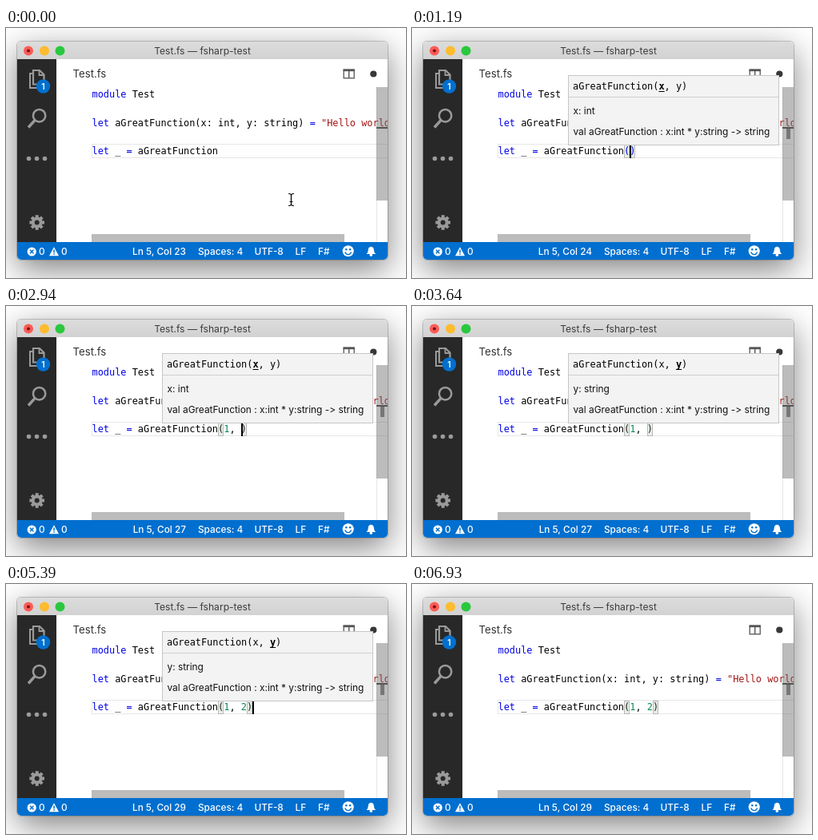
An HTML page with a canvas for the animation above (7000 ms loop, 500x313 px).

```html
<!DOCTYPE html>
<html lang="en">
<head>
<meta charset="utf-8">
<title>Parameter hints</title>
<style>
  html, body { margin: 0; width: 100%; height: 100%; overflow: hidden; background: #fff; }
  canvas { display: block; width: 500px; height: 313px; }
</style>
</head>
<body>
<canvas id="stage" width="500" height="313"></canvas>
<script>
const ctx = document.getElementById('stage').getContext('2d');
const LOOP = 7000, STEP = 70, BLINK = 505;
const LEFT = 14, TOP = 17, WIDTH = 463, HEIGHT = 273;
const CODE_X = 107.5, CHAR = 11.9 * 0.602;
const MONO = '"DejaVu Sans Mono", monospace';
const SANS = 'Inter, sans-serif';
const BLUE = '#0000e6', STRING = '#a31515', NUMBER = '#09885a', STATUS = '#006fcf';
const ICON = '#9a9a9a', SIDEBAR = '#282828';

// Each key press: time, text inside the parentheses, caret column
const keys = [
  { at: 50, args: null, col: 23 },
  { at: 1050, args: '', col: 24 },
  { at: 2030, args: '1', col: 25 },
  { at: 2660, args: '1,', col: 26 },
  { at: 2860, args: '1, ', col: 27 },
  { at: 3990, args: '1, 2', col: 28 },
  { at: 5375, args: '1, 2', col: 29 }
];
const HINT_ON = 1190, HINT_SECOND = 3010, HINT_OFF = 5440;

function rect(x, y, w, h, color) {
  ctx.fillStyle = color;
  ctx.fillRect(x, y, w, h);
}

function frame(x, y, w, h, color, width = 1) {
  ctx.strokeStyle = color;
  ctx.lineWidth = width;
  ctx.strokeRect(x, y, w, h);
}

function disc(x, y, r, color) {
  ctx.fillStyle = color;
  ctx.beginPath();
  ctx.arc(x, y, r, 0, Math.PI * 2);
  ctx.fill();
}

function path(points, color, width, close) {
  ctx.beginPath();
  points.forEach(([x, y]) => ctx.lineTo(x, y));
  if (close) ctx.closePath();
  if (width) {
    ctx.strokeStyle = color;
    ctx.lineWidth = width;
    ctx.stroke();
  } else {
    ctx.fillStyle = color;
    ctx.fill();
  }
}

// Returns the x position just after the text
function text(str, x, y, size, color, { font = SANS, weight = 400, align = 'left' } = {}) {
  ctx.font = `${weight} ${size}px ${font}`;
  ctx.textAlign = align;
  ctx.fillStyle = color;
  ctx.fillText(str, x, y);
  return x + ctx.measureText(str).width;
}

// Draws [text, colour, weight] runs on a monospaced line
function code(x, y, runs) {
  for (const [str, color = '#000', weight = 400] of runs) {
    text(str, x, y, 11.9, color, { font: MONO, weight });
    x += str.length * CHAR;
  }
}

function windowShape(grow = 0) {
  ctx.beginPath();
  ctx.roundRect(LEFT - grow, TOP - grow, WIDTH + 2 * grow, HEIGHT + 2 * grow, 5);
}

function drawShadow() {
  ctx.save();
  ctx.shadowColor = 'rgba(0,0,0,.5)';
  ctx.shadowBlur = 40;
  ctx.shadowOffsetY = 12;
  ctx.fillStyle = '#fff';
  windowShape();
  ctx.fill();
  ctx.restore();
  ctx.strokeStyle = 'rgba(0,0,0,.2)';
  ctx.lineWidth = 1;
  windowShape(.5);
  ctx.stroke();
}

function drawTitleBar() {
  const shade = ctx.createLinearGradient(0, TOP, 0, 39);
  shade.addColorStop(0, '#dcdcdc');
  shade.addColorStop(1, '#d2d2d2');
  rect(LEFT, TOP, WIDTH, 22, shade);
  disc(28, 28.5, 6, '#fc5b57');
  disc(28, 28.5, 2, '#7c1010');
  disc(48, 28.5, 6, '#fdbc2e');
  disc(67.5, 28.5, 6, '#29c83f');
  text('Test.fs — fsharp-test', 245.5, 32.5, 12.1, '#3c3c3c', { align: 'center' });
}

function drawGear(x, y) {
  ctx.save();
  ctx.translate(x, y);
  for (let i = 0; i < 8; i++) {
    rect(-2, -9.3, 4, 5, ICON);
    ctx.rotate(Math.PI / 4);
  }
  ctx.restore();
  disc(x, y, 7, ICON);
  disc(x, y, 3, SIDEBAR);
}

function drawActivityBar() {
  rect(LEFT, 39, 49, 229, SIDEBAR);
  path([[34, 57], [30, 57], [30, 75], [42, 75], [42, 71]], ICON, 2);
  path([[34, 53], [42, 53], [47.5, 58.5], [47.5, 70.5], [34, 70.5]], ICON, 2.2, true);
  path([[41.5, 53], [41.5, 59], [47.5, 59]], ICON, 1.8);
  disc(46.5, 73, 8.7, STATUS);
  text('1', 46.5, 76.8, 10.5, '#fff', { weight: 600, align: 'center' });

  ctx.strokeStyle = ICON;
  ctx.lineWidth = 2.5;
  ctx.beginPath();
  ctx.arc(41.6, 109.7, 7.7, 0, Math.PI * 2);
  ctx.stroke();
  path([[36.2, 115.3], [28, 124.5]], ICON, 3.4);
  [28.5, 38.5, 48.5].forEach(x => disc(x, 163.5, 2.8, ICON));
  drawGear(38.7, 243.5);
}

function drawEditor(state, t) {
  text('Test.fs', 83.5, 61.5, 13.2, '#333');
  frame(422.2, 52.2, 13, 10.6, '#555', 1.3);
  rect(421.6, 51.6, 14.2, 2.6, '#555');
  rect(428, 52, 1.4, 11, '#555');
  disc(459.3, 57.5, 4.1, '#383838');

  frame(107.5, 145.5, 370, 17, '#e6e6e6');
  rect(463, 74, 1, 194, '#e6e6e6');

  code(CODE_X, 87, [['module', BLUE], [' Test']]);
  code(CODE_X, 123, [['let', BLUE], [' aGreatFunction(x: int, y: string) '],
    ['=', BLUE], [' '], ['"Hello world"', STRING]]);

  const { args, col } = state;
  const runs = [['let', BLUE], [' _ '], ['=', BLUE], [' aGreatFunction']];
  if (args !== null) {
    const bracketColor = args ? '#222' : BLUE;
    for (const offset of [22, 23 + args.length]) {
      const x = Math.round(CODE_X + offset * CHAR);
      rect(x, 146, 7, 17, '#e6efe6');
      frame(x + .5, 146.5, 6, 16, '#b9b9b9');
    }
    runs.push(['(', bracketColor]);
    for (const ch of args) runs.push([ch, /\d/.test(ch) ? NUMBER : '#000']);
    runs.push([')', bracketColor]);
  }
  code(CODE_X, 158, runs);

  if (Math.floor((t - state.at) / BLINK) % 2 === 0) {
    rect(Math.round(CODE_X + (col - 1) * CHAR), 145, 2, 18, '#000');
  }

  rect(463, 74, 15, 142, 'rgba(100,100,100,.43)');
  rect(107, 258, 316, 10, 'rgba(100,100,100,.43)');
  rect(463, 124, 15, 2, '#555');
  if (args !== null) rect(468, 126, 5, 13, '#777');
}

function drawHint(second) {
  rect(195, 59, 264, 88, '#f3f3f3');
  frame(195.5, 59.5, 263, 87, '#c6c6c6');
  rect(196, 86, 262, 1, '#cfcfcf');
  const weight = active => active ? 700 : 400;
  code(201, 77, [['aGreatFunction('], ['x', '#000', weight(!second)], [', '],
    ['y', '#000', weight(second)], [')']]);
  rect(201 + (second ? 18 : 15) * CHAR, 79, CHAR, 1, '#000');
  text(second ? 'y: string' : 'x: int', 201.5, 108, 11.9, '#111');
  // Two pieces keep the font from joining "->" into an arrow
  const end = text('val aGreatFunction : x:int * y:string -', 201.5, 134, 11.9, '#111');
  text('> string', end, 134, 11.9, '#111');
}

function drawStatusBar(col) {
  const label = (str, x, align) => text(str, x, 283.5, 11.8, '#fff', { weight: 500, align });
  rect(LEFT, 268, WIDTH, 23, STATUS);
  disc(32.2, 280, 5.6, '#fff');
  path([[30, 277.8], [34.4, 282.2]], STATUS, 1.5);
  path([[34.4, 277.8], [30, 282.2]], STATUS, 1.5);
  label('0', 41);
  path([[60, 274.2], [66, 285.3], [54, 285.3]], '#fff', 0, true);
  rect(59.3, 277.5, 1.5, 4, STATUS);
  rect(59.3, 282.4, 1.5, 1.5, STATUS);
  label('0', 69);
  label('Ln 5, Col ' + col, 225, 'right');
  label('Spaces: 4', 240);
  label('UTF-8', 310.5);
  label('LF', 361.5);
  label('F#', 390);

  disc(427.7, 279.3, 7, '#fff');
  disc(425.3, 277.3, 1.2, STATUS);
  disc(430.1, 277.3, 1.2, STATUS);
  ctx.strokeStyle = STATUS;
  ctx.lineWidth = 1.3;
  ctx.beginPath();
  ctx.arc(427.7, 279.8, 3.8, .15, Math.PI - .15);
  ctx.stroke();

  ctx.fillStyle = '#fff';
  ctx.beginPath();
  ctx.moveTo(450.5, 283);
  ctx.quadraticCurveTo(452.8, 281, 452.8, 277.5);
  ctx.bezierCurveTo(453, 272.5, 459.6, 272.5, 459.8, 277.5);
  ctx.quadraticCurveTo(459.8, 281, 462.2, 283);
  ctx.fill();
  disc(456.3, 284.2, 1.7, '#fff');
}

function drawPointer() {
  path([[353, 207.5], [355, 207.5], [356.5, 209], [358, 207.5], [360, 207.5]], '#111', 1.2);
  path([[353, 222.5], [355, 222.5], [356.5, 221], [358, 222.5], [360, 222.5]], '#111', 1.2);
  path([[356.5, 209], [356.5, 221]], '#111', 1.4);
  path([[354.5, 217.5], [358.5, 217.5]], '#111', 1);
}

function draw(t) {
  const state = keys.filter(key => key.at <= t).pop() || keys[0];
  rect(0, 0, 500, 313, '#fff');
  drawShadow();
  ctx.save();
  windowShape();
  ctx.clip();
  rect(LEFT, TOP, WIDTH, HEIGHT, '#fff');
  drawEditor(state, t);
  drawTitleBar();
  drawActivityBar();
  if (t >= HINT_ON && t < HINT_OFF) drawHint(t >= HINT_SECOND);
  drawStatusBar(state.col);
  if (state.args === null) drawPointer();
  ctx.restore();
}

const start = performance.now();
function tick() {
  const elapsed = (performance.now() - start) % LOOP;
  draw(Math.floor(elapsed / STEP) * STEP);
  requestAnimationFrame(tick);
}
tick();
</script>
</body>
</html>
```
